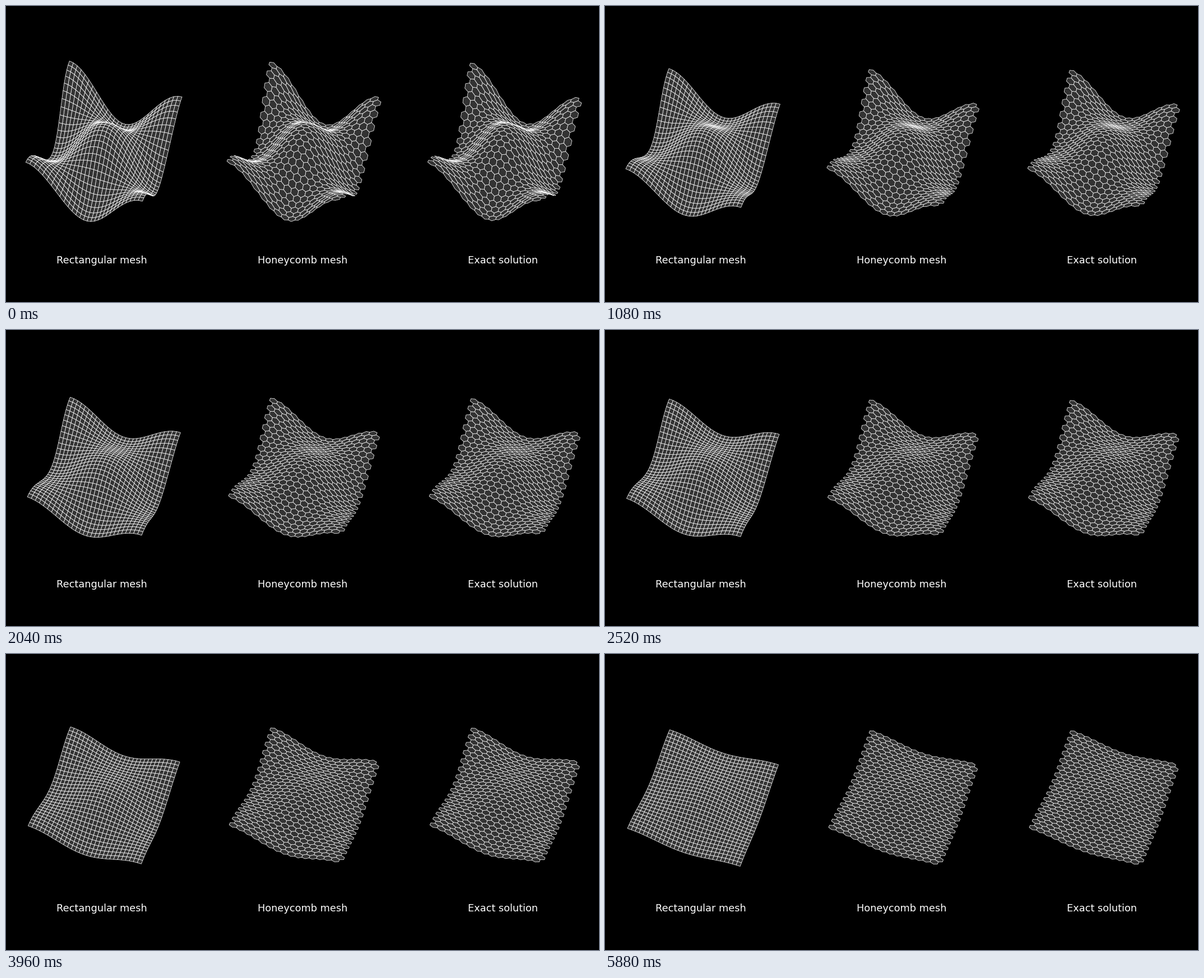
Animation, 1058 px wide and 529 px high, one loop 6000 ms. Source, as a matplotlib script:

```python
import numpy as np
import matplotlib.pyplot as plt
from matplotlib.animation import FuncAnimation
from matplotlib.collections import PolyCollection

W, H, DPI = 1058, 529, 64
FRAMES, INTERVAL = 50, 120
PX = 72 / DPI                      # points per pixel

# Camera: perspective view of the square [-1, 1] x [-1, 1]
ELEV, AZIM = np.radians(65), np.radians(-70)
SCALE, RISE = 104.5, 89.0          # pixels per unit in the plane / in height
NEAR_XY, NEAR_Z = 0.0504, 0.0429   # the same units relative to camera distance
CENTER_X, CENTER_Y, SPACING = 176.5, 259.2, 358

SE, CE = np.sin(ELEV), np.cos(ELEV)
SA, CA = np.sin(AZIM), np.cos(AZIM)


def rect_mesh(nodes=30):
    """Corners of the square cells between nodes x nodes points, (cells, 4, 2)."""
    edge = np.linspace(-1, 1, nodes)
    x, y = np.meshgrid(edge[:-1], edge[:-1])
    unit = np.array([(0, 0), (1, 0), (1, 1), (0, 1)]) * (edge[1] - edge[0])
    return np.stack([x.ravel(), y.ravel()], 1)[:, None] + unit


def hex_mesh(cols=15, rows=31):
    """Corners of staggered rows of hexagons, shape (cells, 6, 2)."""
    w = 2 / (cols + 0.5)
    r = 2 / (rows + 1 / 3)
    j, i = np.meshgrid(np.arange(rows), np.arange(cols), indexing="ij")
    x = -1 + w * (i + 0.5 + 0.5 * (j % 2))
    y = -1 + r * (j + 2 / 3)
    ring = np.array([(0, 2), (1, 1), (1, -1), (0, -2), (-1, -1), (-1, 1)])
    return np.stack([x.ravel(), y.ravel()], 1)[:, None] + ring * (w / 2, r / 3)


def project(cells, step, shift):
    """Screen polygons of the cooling surface, far cells first."""
    x, y = cells[..., 0], cells[..., 1]
    t = step / (FRAMES - 1)
    u = np.exp(-2 * t) * np.cos(np.pi * x) * np.cos(np.pi * y)
    right = SCALE * (-SA * x + CA * y)
    up = SCALE * -SE * (CA * x + SA * y) + RISE * CE * u
    depth = NEAR_XY * CE * (CA * x + SA * y) + NEAR_Z * SE * u
    zoom = 1 / (1 - depth)
    pts = np.stack([CENTER_X + shift + right * zoom, CENTER_Y - up * zoom], -1)
    return pts[np.argsort(depth.mean(1))]


fig = plt.figure(figsize=(W / DPI, H / DPI), dpi=DPI, facecolor="black")
ax = fig.add_axes([0, 0, 1, 1])
ax.set_xlim(0, W)
ax.set_ylim(H, 0)
ax.axis("off")

# title, cells, lead in steps
PANELS = [
    ("Rectangular mesh", rect_mesh(), 0),
    ("Honeycomb mesh", hex_mesh(), 0),
    ("Exact solution", hex_mesh(), 1),
]

surfaces = []
for k, (title, cells, lead) in enumerate(PANELS):
    surface = PolyCollection([], facecolors="#333333", edgecolors="white",
                             linewidths=0.75 * PX)
    ax.add_collection(surface, autolim=False)
    surfaces.append(surface)
    ax.text(171 + SPACING * k, 459.5, title, color="white", ha="center",
            va="baseline", family="DejaVu Sans", size=17.8 * PX)


def draw(frame):
    for k, (_, cells, lead) in enumerate(PANELS):
        surfaces[k].set_verts(project(cells, frame + lead, SPACING * k))
    return surfaces


anim = FuncAnimation(fig, draw, frames=FRAMES, interval=INTERVAL,
                     init_func=lambda: draw(0), repeat=True, repeat_delay=0)
plt.show()
```
